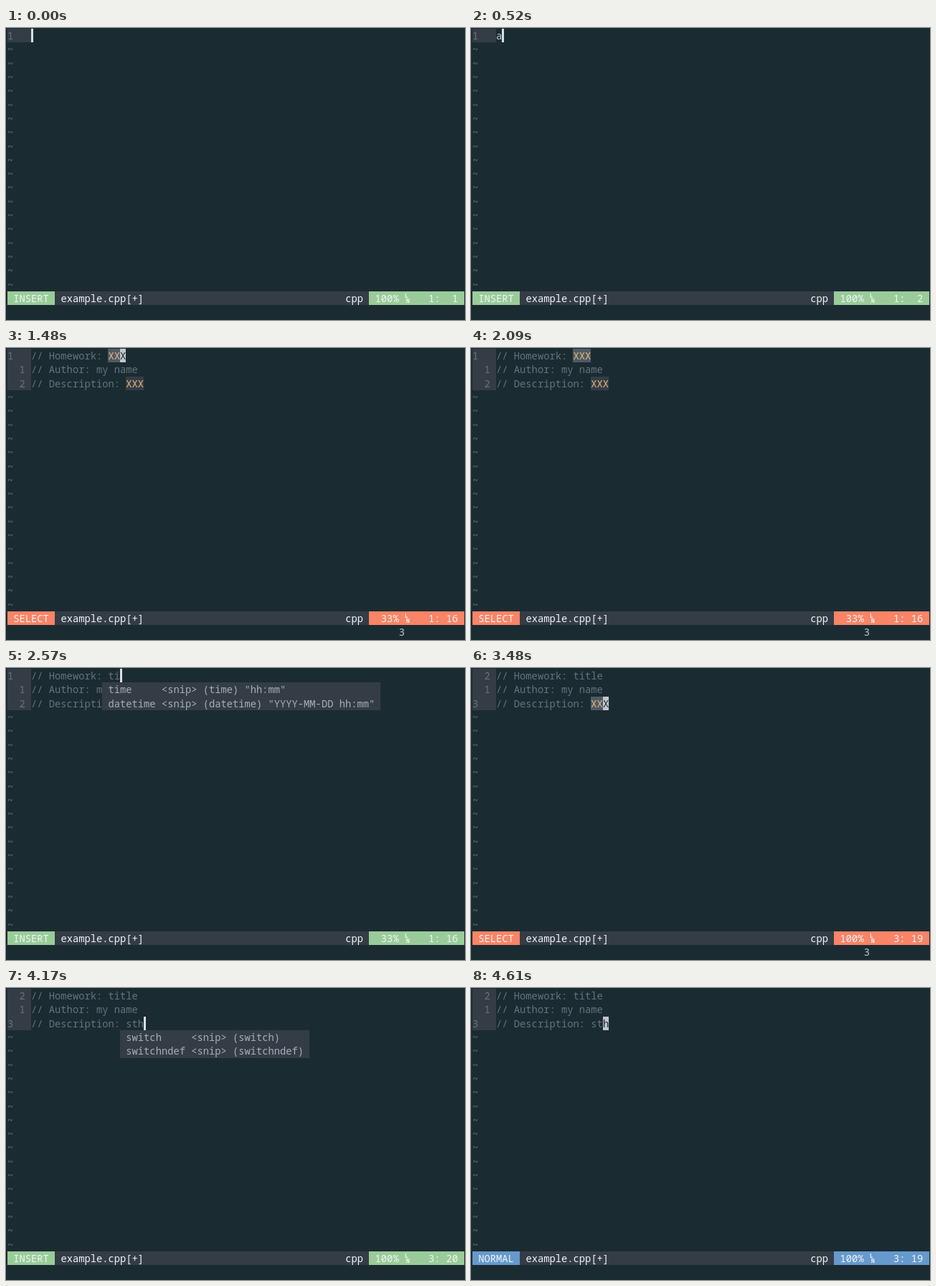
Write an HTML page that moves like this. It is 640 px wide and 408 px high and loops after 4.65 s.

```html
<!DOCTYPE html>
<html lang="en">
<head>
<meta charset="utf-8">
<style>
  html, body { margin: 0; width: 100%; height: 100%; overflow: hidden; background: #1b2b32; }
  #screen {
    position: absolute; left: 0; top: 0; width: 640px; height: 408px; overflow: hidden;
    font: 13.78px/19.32px "Noto Sans Mono", "DejaVu Sans Mono", monospace; color: #c0c5ce;
  }
  #screen div { position: absolute; white-space: pre; }
  #screen .dim { color: #65737e; }
  #screen .panel { background: #343d46; }
  #screen .menu { color: #a7adba; }
  #screen .status { color: #f0f4f6; }
  #screen .beam { width: 2.5px; background: #d8dee9; }
  #screen .block { background: #c0c5ce; color: #1b2b32; }
  #screen .ln { font-size: 8px; font-weight: bold; line-height: 8px; }
  b { font-weight: normal; color: #eebb77; background: #343d46; }
  b.selected { background: #4f5b66; }
</style>
</head>
<body>
<div id="screen"></div>
<script>
const LOOP = 4650, CELL = 8.268, LINE = 19.32, ROWS = 19;
const COLORS = { INSERT: '#99cc99', SELECT: '#f98466', NORMAL: '#6699cc' };
const screen = document.getElementById('screen');

const assignMenu = [['assgn', ' "Assgn Header"']];
const timeMenu = [['time', ' "hh:mm"'], ['datetime', ' "YYYY-MM-DD hh:mm"']];
const structMenu = [['st', ' "struct"'],
  ...'stack set switch switchndef mset uset list umset flist'.split(' ').map(word => [word, ''])];
const switchMenu = [['switch', ''], ['switchndef', '']];

const snippet = (title, text) =>
  ['// Homework: ' + title, '// Author: my name', '// Description: ' + text];
const state = (at, mode, lines, row, menu, menuCol, cursor = true) =>
  ({ at, mode, lines, row, menu, menuCol, cursor });
const typeWord = (at, word, menu) => state(at, 'INSERT', [word], 0, menu, 3);
const typeTitle = (at, word, menu) => state(at, 'INSERT', snippet(word, 'XXX'), 0, menu, 16);
const typeText = (at, word, menu) => state(at, 'INSERT', snippet('title', word), 2, menu, 19);

const timeline = [
  typeWord(0, ''),
  typeWord(480, 'a'),
  typeWord(620, 'as', assignMenu),
  typeWord(760, 'ass', assignMenu),
  typeWord(900, 'assg', assignMenu),
  typeWord(1090, 'assgn', assignMenu),
  state(1350, 'SELECT', snippet('XXX', 'XXX'), 0),
  state(1850, 'SELECT', snippet('XXX', 'XXX'), 0, null, 0, false),
  typeTitle(2390, 't'),
  typeTitle(2520, 'ti', timeMenu),
  typeTitle(2660, 'tit'),
  typeTitle(2780, 'titl'),
  typeTitle(2900, 'title'),
  state(3180, 'SELECT', snippet('title', 'XXX'), 2),
  typeText(3600, 's'),
  typeText(3740, 'st', structMenu),
  typeText(3980, 'sth', switchMenu),
  state(4480, 'NORMAL', snippet('title', 'sth'), 2)
];

const escapeText = text => text.replace(/&/g, '&amp;').replace(/</g, '&lt;');

function cell(row, col, html, kind = '', style = '') {
  const left = 2 + col * CELL, top = 1 + row * LINE;
  return `<div class="${kind}" style="left:${left}px;top:${top}px;${style}">${html}</div>`;
}

function drawMenu(menu, row, col) {
  const wide = Math.max(...menu.map(([word]) => word.length));
  const rows = menu.map(([word, note]) => ` ${word.padEnd(wide)} <snip> (${word})${note} `);
  return cell(row, col, escapeText(rows.join('\n')), 'panel menu');
}

function drawStatus(mode, row, count, column) {
  const fill = `background:${COLORS[mode]}`;
  const percent = Math.floor((row + 1) / count * 100) + '%';
  const ruler = ` ${percent.padStart(4)}     ${row + 1}:${String(column).padStart(3)} `;
  return cell(ROWS, 0, ' '.repeat(77), 'panel') +
    cell(ROWS, 0, ` ${mode} `, 'status', fill) +
    cell(ROWS, 9, 'example.cpp[+]', 'status') +
    cell(ROWS, 57, 'cpp', 'status') +
    cell(ROWS, 61, ruler, 'status', fill) +
    cell(ROWS + 0.1, 67, 'L', 'status ln') +
    cell(ROWS + 0.44, 67.25, 'N', 'status ln');
}

function draw({ mode, lines, row, menu, menuCol, cursor }) {
  const insert = mode === 'INSERT';
  const gutter = lines.map((_, i) =>
    i === row ? `${i + 1}   ` : `${String(Math.abs(i - row)).padStart(3)} `);
  const column = lines[row].length + (insert ? 1 : 0);

  let html = cell(0, 0, gutter.join('\n'), 'panel dim');
  lines.forEach((line, i) => {
    const selected = mode === 'SELECT' && i === row ? 'selected' : '';
    html += cell(i, 4, line.replace('XXX', `<b class="${selected}">XXX</b>`),
      line.startsWith('//') ? 'dim' : '');
  });
  html += cell(lines.length, 0, Array(ROWS - lines.length).fill('~').join('\n'), 'dim');
  if (menu) html += drawMenu(menu, row + 1, menuCol);
  if (cursor) {
    html += cell(row, 3 + column, insert ? ' ' : lines[row].at(-1), insert ? 'beam' : 'block');
  }
  html += drawStatus(mode, row, lines.length, column);
  if (mode === 'SELECT') html += cell(ROWS + 1, 66, '3');
  screen.innerHTML = html;
}

let shown;
function tick() {
  const time = performance.now() % LOOP;
  const current = timeline.findLast(step => step.at <= time);
  if (current !== shown) draw(shown = current);
  requestAnimationFrame(tick);
}
tick();
</script>
</body>
</html>
```
